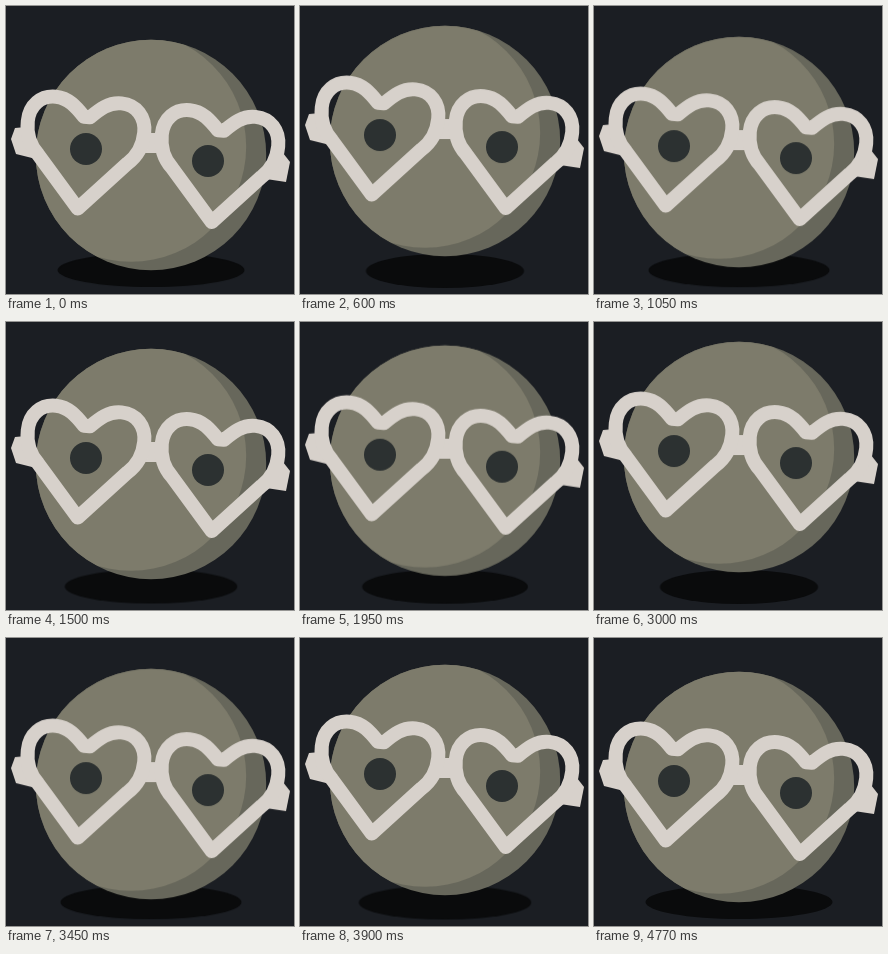
Animation, 288 px wide and 288 px high, one loop 4800 ms. Source, as an HTML page:

```html
<!DOCTYPE html>
<html lang="en">
<head>
<meta charset="utf-8">
<title>Bobbing ball with heart glasses</title>
<style>
  html, body { margin: 0; width: 100%; height: 100%; overflow: hidden; background: #1b1e23; }
  svg { display: block; width: 100%; height: 100%; }
</style>
</head>
<body>
<svg viewBox="0 0 288 288">
  <defs>
    <clipPath id="round"><circle cx="145" cy="149" r="115.2"/></clipPath>
    <path id="heart" d="M-3 0H3C12-9 20-17 33-17C48-17 58.5-6 58.5 10C58.5 23 55 33 45 42L0 92
      L-45 42C-55 33-58.5 23-58.5 10C-58.5-6-48-17-33-17C-20-17-12-9-3 0Z"/>
  </defs>

  <g transform="translate(145 265)">
    <ellipse id="shadow" rx="93.5" ry="17" fill="#0a0b0c"/>
  </g>

  <g id="ball">
    <circle cx="145" cy="149" r="115.2" fill="#67675b"/>
    <circle cx="125" cy="140.6" r="115.2" fill="#7d7b6b" clip-path="url(#round)"/>
    <g fill="#2c3131">
      <circle cx="80" cy="143" r="16"/>
      <circle cx="202" cy="155" r="16"/>
    </g>
    <g fill="#d7d1cb">
      <path d="M9 122L5 133L10 148L30 153V132L20 121Z"/>
      <path d="M277 147L284 156L280 176L260 173L264 156Z"/>
      <path d="M136 127H158V147H136Z"/>
    </g>
    <g fill="none" stroke="#d7d1cb" stroke-width="14" stroke-linejoin="round">
      <use href="#heart" transform="translate(81 111) rotate(5.75)"/>
      <use href="#heart" transform="translate(215 124.5) rotate(5.75)"/>
    </g>
  </g>
</svg>
<script>
  const PERIOD = 1200;
  const LIFT = 14;
  const NARROW = 79 / 93.5;

  // Linear rise and fall with a short rest at the bottom.
  function bob(id, low, high) {
    const steps = [[0, low], [0.5, high], [0.975, low], [1, low]];
    document.getElementById(id).animate(
      steps.map(([offset, transform]) => ({ offset, transform })),
      { duration: PERIOD, iterations: Infinity, easing: "linear" }
    );
  }

  bob("ball", "translateY(0px)", `translateY(${-LIFT}px)`);
  bob("shadow", "translateY(-1px) scaleX(1)", `translateY(0px) scaleX(${NARROW})`);
</script>
</body>
</html>
```
